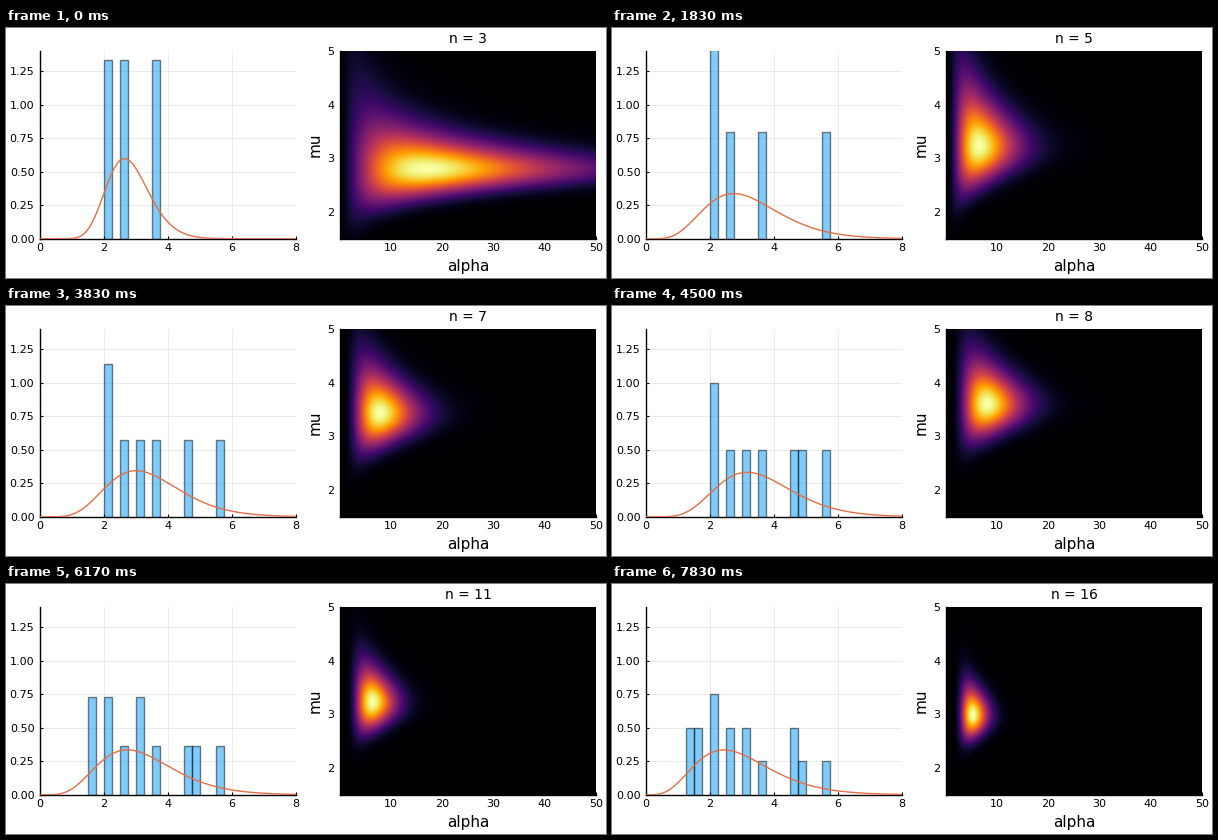
Write a matplotlib script that moves like this. It is 600 by 250 pixels and loops after 8000 ms.

```python
import math

import matplotlib.pyplot as plt
import numpy as np
from matplotlib.animation import FuncAnimation

WIDTH, HEIGHT, DPI = 600, 250, 100
LOOP_MS, STEP_MS = 8000, 40
BIN = 0.25

# Observations in order of arrival; three are known at the start.
SAMPLES = np.array([2.07, 2.62, 3.74, 5.66, 2.09, 4.66, 3.24, 4.78,
                    1.74, 3.24, 1.72, 2.74, 4.74, 2.08, 1.40, 1.42])
ARRIVALS_MS = [500, 1830, 2830, 3830, 4500, 5170, 5830,
               6170, 6500, 6830, 7170, 7500, 7830]
START_COUNT = 3

ALPHA_RANGE = (0.1, 50)
MU_RANGE = (1.5, 5)

plt.rcParams.update({"font.family": "DejaVu Sans", "axes.linewidth": 1})
log_gamma = np.vectorize(math.lgamma)


def cell_centres(low, high, count):
    return low + (np.arange(count) + 0.5) * (high - low) / count


alphas = cell_centres(*ALPHA_RANGE, 256)
mus = cell_centres(*MU_RANGE, 188)[:, None]
rates = alphas / mus
log_norm = alphas * np.log(rates) - log_gamma(alphas)
edges = np.arange(0, 8 + BIN, BIN)
xs = np.linspace(0.001, 8, 400)


def likelihood(data):
    """Gamma likelihood over the (mu, alpha) grid, scaled to a peak of 1."""
    log_l = (len(data) * log_norm + (alphas - 1) * np.log(data).sum()
             - rates * data.sum())
    return np.exp(log_l - log_l.max())


def best_gamma(data):
    """Density of the maximum-likelihood gamma distribution along xs."""
    mu = data.mean()
    s = math.log(mu) - np.log(data).mean()
    alpha = (3 - s + math.sqrt((s - 3) ** 2 + 24 * s)) / (12 * s)
    rate = alpha / mu
    return np.exp(alpha * math.log(rate) - math.lgamma(alpha)
                  + (alpha - 1) * np.log(xs) - rate * xs)


def summarise(count):
    data = SAMPLES[:count]
    heights = np.histogram(data, edges)[0] / (count * BIN)
    return heights, best_gamma(data), likelihood(data)


states = {n: summarise(n) for n in range(START_COUNT, len(SAMPLES) + 1)}

fig = plt.figure(figsize=(WIDTH / DPI, HEIGHT / DPI), dpi=DPI, facecolor="white")


def add_panel(left, xlim, ylim, xticks, yticks):
    top, bottom, width = 23.2, 210.8, 256
    ax = fig.add_axes([left / WIDTH, 1 - bottom / HEIGHT,
                       width / WIDTH, (bottom - top) / HEIGHT])
    ax.set(xlim=xlim, ylim=ylim, xticks=xticks, yticks=yticks)
    ax.spines[["top", "right"]].set_visible(False)
    ax.tick_params(direction="in", length=2, width=0.8, labelsize=8)
    ax.tick_params(axis="x", pad=3.3)
    ax.tick_params(axis="y", pad=4)
    return ax


def add_text(x, y, text, size, **style):
    return fig.text(x / WIDTH, 1 - y / HEIGHT, text, fontsize=size,
                    ha="center", va="baseline", **style)


hist_ax = add_panel(34, (0, 8), (0, 1.4), range(0, 9, 2), np.arange(0, 1.3, 0.25))
hist_ax.set_axisbelow(True)
hist_ax.grid(color="black", alpha=0.1, linewidth=0.5)
bars = hist_ax.bar(edges[:-1], np.zeros(len(edges) - 1), BIN, align="edge",
                   facecolor="#009afa", edgecolor="black", alpha=0.5,
                   linewidth=1, zorder=2.7)
curve, = hist_ax.plot(xs, np.zeros_like(xs), color="#e26f46", linewidth=1, zorder=3)

heat_ax = add_panel(334, ALPHA_RANGE, MU_RANGE, range(10, 51, 10), range(2, 6))
heat = heat_ax.imshow(states[START_COUNT][2], cmap="inferno", vmin=0, vmax=1,
                      origin="lower", extent=(*ALPHA_RANGE, *MU_RANGE),
                      aspect="auto", interpolation="nearest")
title = add_text(462, 15, "", 10)
add_text(462, 243, "alpha", 11)
add_text(314, 117, "mu", 11, rotation=90, rotation_mode="anchor")


def draw(frame):
    end = (frame + 1) * STEP_MS
    count = START_COUNT + sum(t < end for t in ARRIVALS_MS)
    heights, density, grid = states[count]
    for bar, height in zip(bars, heights):
        bar.set_height(height)
        bar.set_visible(height > 0)
    curve.set_ydata(density)
    heat.set_data(grid)
    title.set_text(f"n = {count}")
    return [*bars, curve, heat, title]


animation = FuncAnimation(fig, draw, frames=LOOP_MS // STEP_MS,
                          interval=STEP_MS, repeat=True, repeat_delay=0)
plt.show()
```
